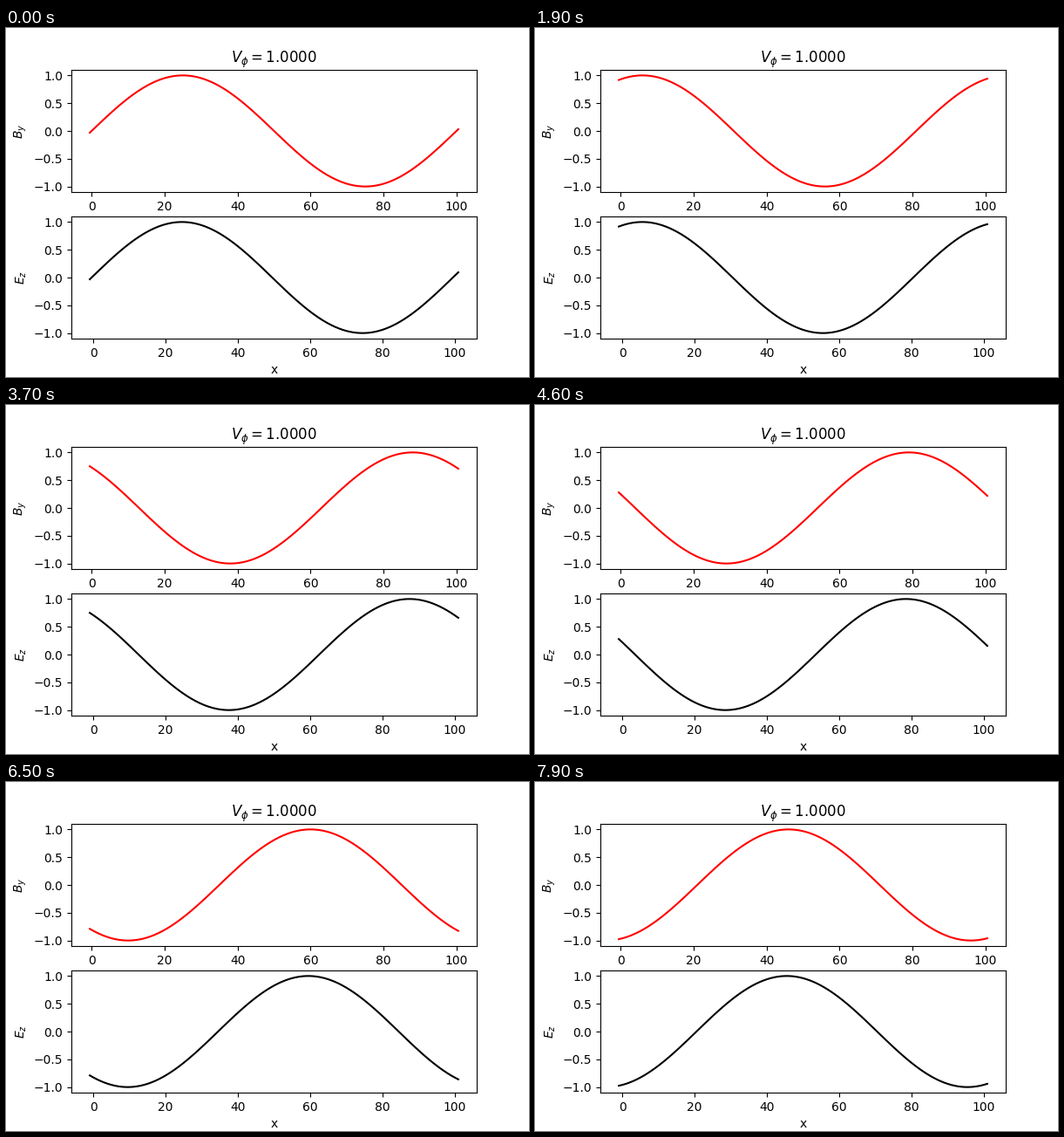
Recreate the animation shown at these times as a matplotlib script. Size 600 by 400 pixels, loop 8 s.

```python
import matplotlib.pyplot as plt
import numpy as np
from matplotlib.animation import FuncAnimation

FRAMES, INTERVAL = 80, 100
WAVELENGTH, SPEED = 100, 1.0


def wave(x, t):
    return np.sin(2 * np.pi * (x + SPEED * t) / WAVELENGTH)


# Staggered grids: the electric field sits half a cell (and half a step) off.
x_b = np.arange(-0.5, 101)
x_e = np.arange(-1, 102)

fig, (ax_b, ax_e) = plt.subplots(2, 1, figsize=(6, 4), dpi=100)
line_b, = ax_b.plot(x_b, wave(x_b, 0), "r")
line_e, = ax_e.plot(x_e, wave(x_e, 0.5), "k")

ax_b.set_title(rf"$V_\phi = {SPEED:.4f}$")
ax_b.set_ylabel("$B_y$")
ax_e.set_ylabel("$E_z$")
ax_e.set_xlabel("x")


def update(step):
    line_b.set_ydata(wave(x_b, step))
    line_e.set_ydata(wave(x_e, step + 0.5))
    return line_b, line_e


anim = FuncAnimation(fig, update, frames=FRAMES, interval=INTERVAL,
                     repeat=True, repeat_delay=0)
plt.show()
```
